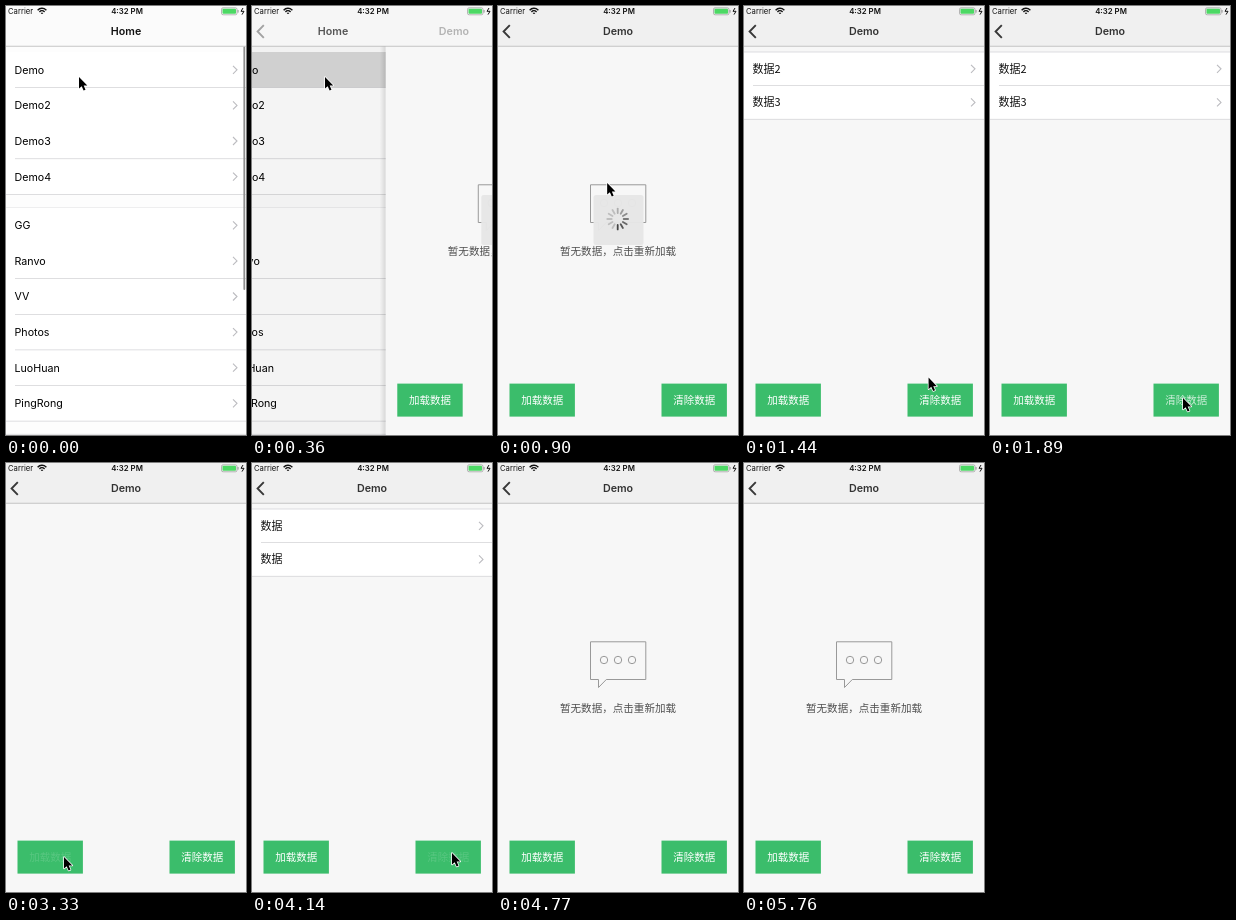
Recreate the animation shown at these times as an HTML page with a canvas. Size 240x429 px, loop 5850 ms.

```html
<!DOCTYPE html>
<html lang="zh">
<head>
<meta charset="utf-8">
<title>Empty list demo</title>
<style>
html, body { margin: 0; width: 100%; height: 100%; overflow: hidden; background: #fff; }
canvas { display: block; width: 240px; height: 429px; }
</style>
</head>
<body>
<canvas id="stage"></canvas>
<script>
const W = 240, H = 429, LOOP = 5850, STEP = 90, NAV = 40;
const LATIN = 'Inter, "Noto Sans CJK SC", "Noto Sans CJK", sans-serif';
const CJK = '"Noto Sans CJK SC", "Noto Sans CJK", Inter, sans-serif';
const GROUPS = [
  ['Demo', 'Demo2', 'Demo3', 'Demo4'],
  ['GG', 'Ranvo', 'VV', 'Photos', 'LuoHuan', 'PingRong']
];
const TOP = 46, ROW = 35.6, GAP = 13.1, DATA_ROW = 33.6;
const RULE = '#c8c8cc', INK = '#111';

// moments of the story, in ms
const OPEN = 252, LOADED = 1350, CLEAR = 2070, RELOAD = 3330, RELOADED = 3690, CLEAR_AGAIN = 4230;

const canvas = document.getElementById('stage');
const g = canvas.getContext('2d');
const dpr = Math.max(1, window.devicePixelRatio || 1);
canvas.width = Math.round(W * dpr);
canvas.height = Math.round(H * dpr);

const between = (t, a, b) => t >= a && t < b;
const clamp = u => Math.min(1, Math.max(0, u));
const mix = (a, b, u) => a + (b - a) * u;
const smooth = u => u * u * (3 - 2 * u);
const gray = v => `rgb(${Math.round(v)},${Math.round(v)},${Math.round(v)})`;

// critically damped spring
function pushProgress(t) {
  const x = Math.max(0, t - OPEN) * .0139;
  return x > 7.5 ? 1 : 1 - (1 + x) * Math.exp(-x);
}

// text opacity of a button that fires at the given moment
function tapInk(t, moment) {
  const d = t - moment;
  return 1 - .85 * Math.min(clamp((d + 210) / 100), clamp((180 - d) / 180));
}

function pointerAt(t) {
  let x = 73, y = 71;
  const glide = (from, to, tx, ty, bow = 0) => {
    const s = smooth(clamp((t - from) / (to - from)));
    x = mix(x, tx, s) - bow * Math.sin(Math.PI * s);
    y = mix(y, ty, s);
  };
  glide(450, 1620, 193, 392, 4);
  glide(2160, 2970, 58, 394);
  glide(3510, 4050, 200, 390);
  glide(4410, 4860, 248, 335);
  return [x, y];
}

function box(x, y, w, h, color) {
  g.fillStyle = color;
  g.fillRect(x, y, w, h);
}

function pill(x, y, w, h, r, color) {
  g.beginPath();
  g.roundRect(x, y, w, h, r);
  g.fillStyle = color;
  g.fill();
}

function label(text, x, y, size, { color = INK, align = 'left', weight = 400, font = LATIN } = {}) {
  g.font = `${weight} ${size}px ${font}`;
  g.textAlign = align;
  g.textBaseline = 'alphabetic';
  g.fillStyle = color;
  g.fillText(text, x, y + size * .365);
}

function stroke(path, color, width) {
  g.strokeStyle = color;
  g.lineWidth = width;
  g.stroke(path);
}

function angle(x, y, w, h, color, width) {
  const path = new Path2D();
  path.moveTo(x, y - h);
  path.lineTo(x + w, y);
  path.lineTo(x, y + h);
  stroke(path, color, width);
}

const chevron = y => angle(227, y, 4, 4, '#bcbcc0', 1.1);
const hairline = (x, y) => box(x, y - .3, W - x, .6, RULE);

function statusBar() {
  label('Carrier', 2, 5, 7.7);
  label('4:32 PM', 121, 5, 7.8, { align: 'center', weight: 600 });
  for (let r = 1; r < 7; r += 2.5) {
    const wave = new Path2D();
    wave.arc(36, 8.3, r, -Math.PI * .76, -Math.PI * .24);
    stroke(wave, INK, 1.4);
  }
  const shell = new Path2D();
  shell.roundRect(215.5, 1.8, 15.5, 7, 1.6);
  stroke(shell, '#8a8a8a', .6);
  pill(216.5, 2.8, 13.5, 5, .8, '#4cd964');
  box(231.6, 4, .9, 2.6, '#8a8a8a');
  stroke(new Path2D('M237 2l-2 3.3h3l-2 3.3'), INK, 1);
}

function navBar(p) {
  box(0, 0, W, NAV, gray(mix(251, 240, p)));
  box(0, NAV - .2, W, .8, '#b8b8b8');
  statusBar();
  const title = { align: 'center', weight: 600 };
  g.globalAlpha = 1 - p ** 1.5;
  label('Home', 120 - 88 * p, 25.5, 10.7, title);
  g.globalAlpha = p ** 1.3;
  label('Demo', mix(267, 120, p), 25.5, 10.7, { ...title, color: '#333' });
  g.globalAlpha = p;
  angle(11.8, 25.5, -6.2, 6.3, '#383838', 1.9);
  g.globalAlpha = 1;
}

function homePage(t) {
  box(0, NAV, W, H - NAV, '#fdfdfd');
  let y = TOP;
  for (const names of GROUPS) {
    box(0, y, W, ROW * names.length, '#fff');
    names.forEach((name, i) => {
      const mid = y + ROW / 2;
      if (name === 'Demo' && t >= 180) box(0, y, W, ROW, '#d9d9d9');
      label(name, 8.5, mid, 10.7, { color: '#000' });
      chevron(mid);
      // hairlines just past a pixel row vanish in the downscaled look
      if (i && y % 1 > .25) hairline(9, y);
      y += ROW;
    });
    hairline(0, y);
    y += GAP;
    hairline(0, y);
  }
  if (t < OPEN) pill(237.4, NAV + .5, 1.8, 243.5, .9, '#8e8e8e');
}

function emptyView() {
  stroke(new Path2D('M92.5 178.8h55.3v37.7h-39.5l-7.8 8v-8h-8z'), '#999', 1);
  for (let i = -1; i < 2; i++) {
    const dot = new Path2D();
    dot.arc(120 + 14 * i, 197, 3.7, 0, Math.PI * 2);
    stroke(dot, '#999', 1);
  }
  label('暂无数据，点击重新加载', 62, 245, 10.55, { color: '#505050', font: CJK });
}

function spinner(t) {
  pill(95.5, 189, 50, 50, 2.5, 'rgba(231,231,231,.97)');
  const head = Math.floor(t / STEP) + 8;
  g.save();
  g.translate(119.7, 213);
  g.lineCap = 'round';
  for (let i = 0; i < 12; i++) {
    const age = (head - i + 12) % 12;
    stroke(new Path2D('M0-6v-4.4'), gray(70 + 120 * clamp(age / 7)), 1.8);
    g.rotate(Math.PI / 6);
  }
  g.restore();
}

function dataList(names) {
  box(0, TOP, W, DATA_ROW * names.length, '#fff');
  names.forEach((name, i) => {
    const y = TOP + DATA_ROW * i;
    label(name, 8.5, y + DATA_ROW / 2, 11, { font: CJK });
    chevron(y + DATA_ROW / 2);
    hairline(i ? 9 : 0, y);
  });
  hairline(0, TOP + DATA_ROW * names.length);
}

function button(text, x, ink) {
  box(x - 32.7, 377.6, 65.4, 33, '#3bbd6b');
  label(text, x, 394, 10.5, { color: `rgba(255,255,255,${ink})`, align: 'center', font: CJK });
}

function demoPage(t) {
  box(0, NAV, W, H - NAV, '#f7f7f7');
  const reloading = between(t, RELOAD, RELOADED);
  if (between(t, LOADED, CLEAR)) dataList(['数据2', '数据3']);
  else if (between(t, RELOADED, CLEAR_AGAIN)) dataList(['数据', '数据']);
  else if (!reloading) emptyView();
  if (t < LOADED || reloading && t > RELOAD) spinner(t);
  button('加载数据', 44.2, tapInk(t, RELOAD));
  button('清除数据', 196.2, Math.min(tapInk(t, CLEAR), tapInk(t, CLEAR_AGAIN)));
}

function pointer(t) {
  const arrow = new Path2D('M0 0v11.6l2.7-2.3 1.9 4.2 1.9-.8-1.8-4.1h3.6z');
  g.save();
  g.translate(...pointerAt(t));
  g.lineJoin = 'round';
  stroke(arrow, '#fff', 1.5);
  g.fillStyle = '#000';
  g.fill(arrow);
  g.restore();
}

function draw(t) {
  g.setTransform(dpr, 0, 0, dpr, 0, 0);
  g.clearRect(0, 0, W, H);
  const p = pushProgress(t), left = W * (1 - p);
  g.save();
  g.translate(-72 * p, 0);
  homePage(t);
  g.restore();
  if (p > 0) {
    box(0, NAV, left, H - NAV, `rgba(0,0,0,${.1 * p})`);
    const shade = g.createLinearGradient(left - 6, 0, left, 0);
    shade.addColorStop(0, 'rgba(0,0,0,0)');
    shade.addColorStop(1, 'rgba(0,0,0,.12)');
    box(left - 6, NAV, 6, H - NAV, shade);
    g.save();
    g.translate(left, 0);
    demoPage(t);
    g.restore();
  }
  navBar(p);
  pointer(t);
}

let start;
function tick(now) {
  if (start === undefined) start = now;
  const t = Math.max(0, now - start) % LOOP;
  draw(Math.floor(t / STEP) * STEP);
  requestAnimationFrame(tick);
}
draw(0);
requestAnimationFrame(tick);
</script>
</body>
</html>
```
